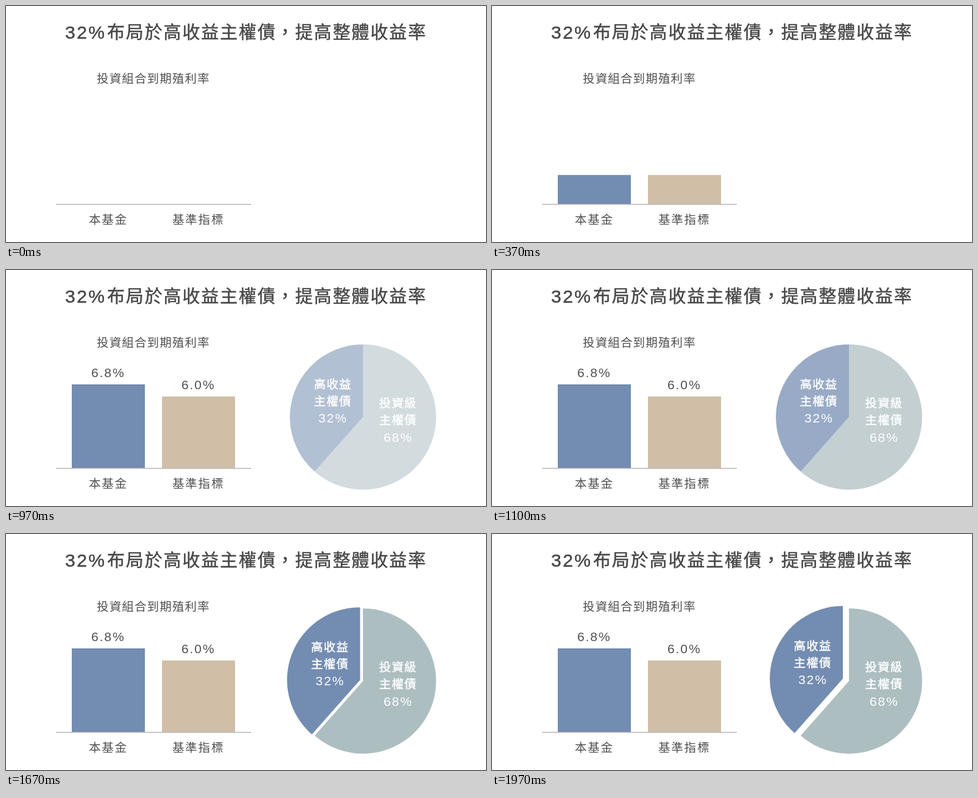
An HTML page that plays this animation: 788 px wide and 390 px high, repeating every 2030 ms.

```html
<!DOCTYPE html>
<html lang="zh-TW">
<head>
<meta charset="utf-8">
<style>
  html, body { margin: 0; width: 100%; height: 100%; overflow: hidden; background: #fff; }
  svg { display: block; width: 788px; height: 390px; }
  text { font: 19.5px "Noto Sans CJK TC", "Noto Sans CJK", sans-serif; letter-spacing: 1.15px; fill: #505050; }
  .axis { letter-spacing: 1.8px; }
  .num { font: 21px "Liberation Sans", Arial, sans-serif; letter-spacing: 1.9px; }
  .title { font-size: 29px; letter-spacing: 1.87px; fill: #484848; stroke: #484848; stroke-width: .5px; }
  .title.num { font-size: 30px; letter-spacing: 2.5px; }
  #pie text { fill: #fff; }
  #pie text:not(.num) { stroke: #fff; stroke-width: .45px; }
</style>
</head>
<body>
<svg viewBox="0 0 788 390">
  <clipPath id="wipe"><rect id="window" x="80" width="325" y="327" height="0"/></clipPath>

  <text class="title num" x="97" y="54">32%</text>
  <text class="title" x="166" y="54">布局於高收益主權債，提高整體收益率</text>
  <text x="149" y="127.3">投資組合到期殖利率</text>

  <g clip-path="url(#wipe)">
    <rect x="108" y="189" width="120" height="138" fill="#738cb1"/>
    <rect x="256" y="209" width="120" height="118" fill="#d0bea6"/>
    <text class="num" x="140" y="176.5">6.8%</text>
    <text class="num" x="288" y="196.5">6.0%</text>
  </g>
  <rect x="82" y="327" width="320" height="1.5" fill="#b6b6b8"/>
  <text class="axis" x="136" y="359.5">本基金</text>
  <text class="axis" x="273" y="359.5">基準指標</text>

  <g id="pie">
    <path d="M586 243V123A120 120 0 1 1 506.8 333.1Z" fill="#adbec1"/>
    <text x="612.5" y="227.3">投資級</text>
    <text x="612.5" y="255.3">主權債</text>
    <text class="num" x="620" y="283.5">68%</text>
    <g id="slice">
      <path d="M586 243V123A120 120 0 0 0 506.8 333.1Z" fill="#738cb1"/>
      <text x="505.5" y="195.5">高收益</text>
      <text x="505.5" y="223.5">主權債</text>
      <text class="num" x="513" y="251.5">32%</text>
    </g>
  </g>
</svg>
<script>
  const LOOP = 2030;
  const $ = id => document.getElementById(id);
  const progress = (t, start, length) => Math.min(1, Math.max(0, (t - start) / length));
  const ease = p => (1 - Math.cos(Math.PI * p)) / 2;

  function draw(t) {
    // Bars and their values appear from the axis upwards
    const height = 200 * ease(progress(t, 28, 1055));
    $("window").setAttribute("y", 327 - height);
    $("window").setAttribute("height", height);

    $("pie").setAttribute("opacity", progress(t, 602, 683));

    const pull = progress(t, 1412, 556);
    $("slice").setAttribute("transform", `translate(${-10 * pull} ${-4 * pull})`);
  }

  const begin = performance.now();
  function tick() {
    draw((performance.now() - begin) % LOOP);
    requestAnimationFrame(tick);
  }
  tick();
</script>
</body>
</html>
```
